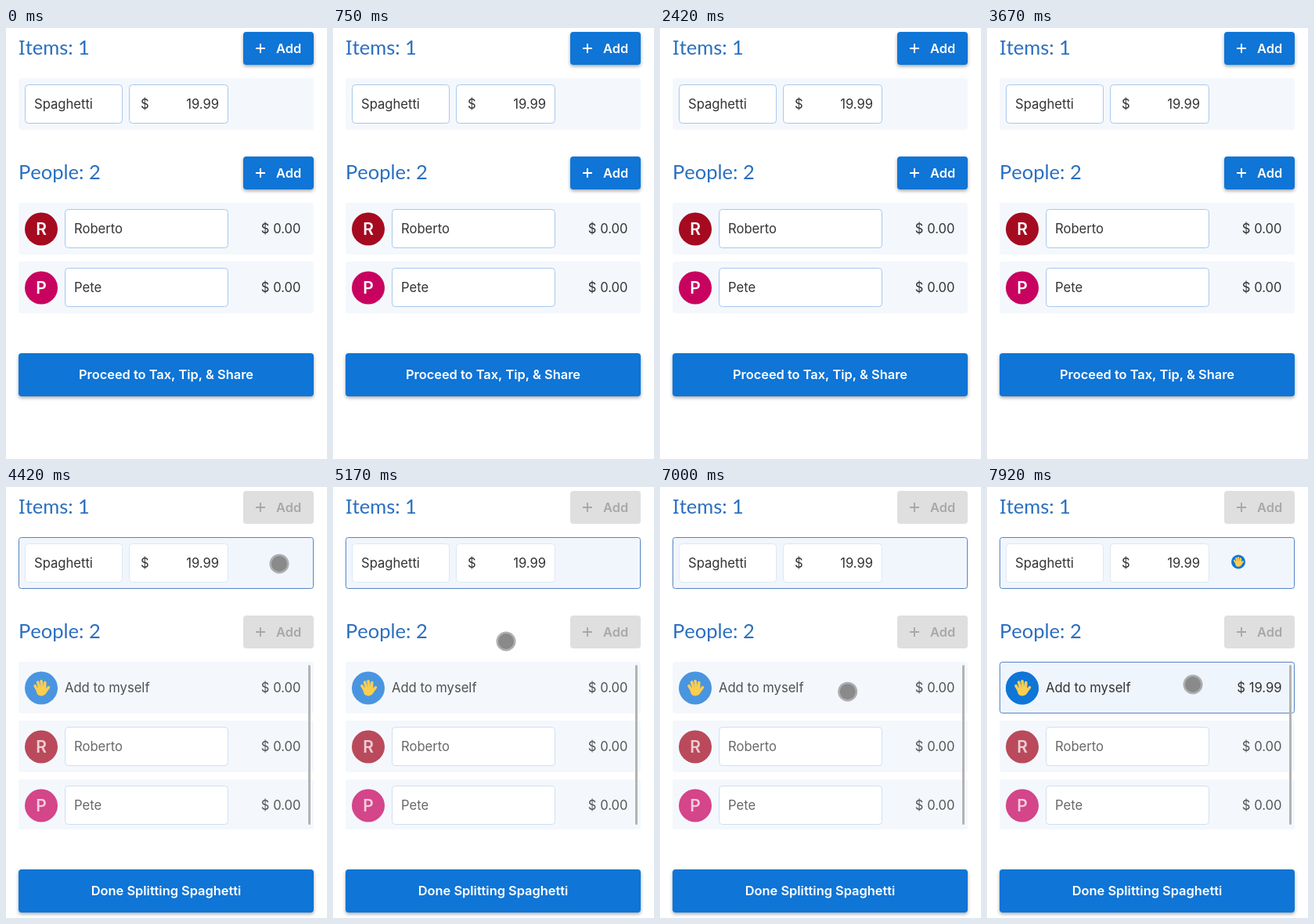
Write an HTML page with a canvas that moves like this. It is 410 by 550 pixels and loops after 8000 ms.

```html
<!DOCTYPE html>
<html lang="en">
<head>
<meta charset="utf-8">
<title>Bill splitter</title>
<style>
html, body { margin: 0; width: 100%; height: 100%; overflow: hidden; background: #fff; }
canvas { display: block; width: 410px; height: 550px; }
</style>
</head>
<body>
<canvas id="stage"></canvas>
<script>
const W = 410, H = 550, LOOP = 8000;
const SPLIT_AT = 4050, PICK_AT = 7600;
const BLUE = '#0f75d6', INK = '#333', ROW = '#f4f8fd';
const BODY = '16.6px Inter, sans-serif';
const BOLD = '600 16.4px Inter, sans-serif';
const PEOPLE = [
  { name: 'Roberto', color: '#a50a20' },
  { name: 'Pete', color: '#c8035f' }
];
// Pointer stops: time, x, y
const PATH = [
  [3700, 349, 98], [4480, 349, 98], [5120, 221, 197], [5400, 221, 197],
  [6250, 230, 265], [6750, 230, 265], [7450, 263, 252], [8000, 263, 252]
];

const canvas = document.getElementById('stage');
const ctx = canvas.getContext('2d');
const dpr = window.devicePixelRatio || 1;
canvas.width = W * dpr;
canvas.height = H * dpr;

const clamp = v => Math.max(0, Math.min(1, v));
const ease = v => v * v * (3 - 2 * v);
const ramp = (t, start, length) => ease(clamp((t - start) / length));

function box(x, y, w, h, r, fill, stroke) {
  ctx.beginPath();
  ctx.roundRect(x, y, w, h, r);
  if (fill) { ctx.fillStyle = fill; ctx.fill(); }
  if (stroke) { ctx.strokeStyle = stroke; ctx.lineWidth = 1; ctx.stroke(); }
}

function disc(x, y, r, fill) {
  ctx.beginPath();
  ctx.arc(x, y, r, 0, Math.PI * 2);
  ctx.fillStyle = fill;
  ctx.fill();
}

function text(str, x, y, color = INK, font = BODY, align = 'left') {
  ctx.font = font;
  ctx.fillStyle = color;
  ctx.textAlign = align;
  ctx.fillText(str, x, y);
  return ctx.measureText(str).width;
}

function withAlpha(alpha, draw) {
  if (alpha <= 0) return;
  ctx.save();
  ctx.globalAlpha *= alpha;
  draw();
  ctx.restore();
}

function raised(x, y, w, h) {
  ctx.save();
  ctx.shadowColor = 'rgba(0,0,0,.35)';
  ctx.shadowBlur = 4 * dpr;
  ctx.shadowOffsetY = 2 * dpr;
  box(x, y, w, h, 4, BLUE);
  ctx.restore();
}

function addButton(y, off) {
  const face = color => {
    ctx.strokeStyle = color;
    ctx.lineWidth = 1.9;
    ctx.beginPath();
    ctx.moveTo(319, y + 21); ctx.lineTo(331, y + 21);
    ctx.moveTo(325, y + 15); ctx.lineTo(325, y + 27);
    ctx.stroke();
    text('Add', 345, y + 26.5, color, BOLD);
  };
  withAlpha(1 - off, () => { raised(303, y, 90, 42); face('#fff'); });
  withAlpha(off, () => { box(303, y, 90, 42, 4, '#dfdfdf'); face('#a8a8a8'); });
}

function mainButton(y, label) {
  raised(16, y, 377, 55);
  text(label, 204.5, y + 33, '#fff', BOLD, 'center');
}

function field(x, y, w, stroke) {
  box(x + .5, y + .5, w - 1, 49, 4, '#fff', stroke);
}

function hand(x, y, scale) {
  ctx.save();
  ctx.translate(x, y);
  ctx.rotate(-.16);
  ctx.scale(scale, scale);
  ctx.strokeStyle = ctx.fillStyle = '#fbce50';
  ctx.lineCap = 'round';
  ctx.lineWidth = 3.6;
  const fingers = [[-5, 2, -7.5, -4], [-2, 0, -3.2, -8], [1.4, 0, 1.4, -8.6], [4.4, 1, 5.8, -6], [4, 6, 9.4, .8]];
  for (const [ax, ay, bx, by] of fingers) {
    ctx.beginPath();
    ctx.moveTo(ax, ay);
    ctx.lineTo(bx, by);
    ctx.stroke();
  }
  ctx.beginPath();
  ctx.roundRect(-6.8, -1, 13, 11, [2, 3, 6, 6]);
  ctx.fill();
  ctx.restore();
}

function heading(first, rest, y) {
  const font = '25.5px Lato, sans-serif';
  const firstFont = first === 'I' ? '25.5px "Noto Sans", sans-serif' : font;
  const w = text(first, 16, y, '#2a6fc0', firstFont);
  text(rest, 16 + w, y, '#2a6fc0', font);
}

function itemRow(split, picked) {
  box(16, 64, 377, 66, 3, ROW);
  withAlpha(split, () => box(16.5, 64.5, 376, 65, 3, '#f1f6fd', '#5585c4'));
  const edge = split > .5 ? '#dde7f3' : '#a8c8ec';
  field(24, 72, 125, edge);
  field(157, 72, 127, edge);
  text('Spaghetti', 36, 103);
  text('$', 172, 103);
  text('19.99', 272, 103, INK, BODY, 'right');
  withAlpha(picked, () => {
    disc(321, 95.5, 9, BLUE);
    hand(321, 95.5, .62);
  });
}

function personRow(person, y, split) {
  box(16, y, 377, 66, 3, ROW);
  withAlpha(split ? .73 : 1, () => {
    disc(45, y + 33.5, 21, person.color);
    text(person.name[0], 45, y + 41, '#fff', '600 21px Inter, sans-serif', 'center');
  });
  field(75, y + 8, 209, split ? '#cfdff1' : '#a8c8ec');
  text(person.name, 87, y + 39, split ? '#686868' : INK);
  text('$ 0.00', 376.5, y + 39, split ? '#555' : INK, BODY, 'right');
}

function myselfRow(picked) {
  box(16, 223, 377, 66, 3, ROW);
  withAlpha(picked, () => box(16.5, 223.5, 376, 65, 3, '#eff5fd', '#5585c4'));
  disc(45, 256.5, 21, '#4a95e0');
  withAlpha(picked, () => disc(45, 256.5, 21, BLUE));
  hand(45, 256.5, 1);
  const color = picked > .5 ? INK : '#505050';
  text('Add to myself', 75, 262, color);
  text(picked > 0 ? '$ 19.99' : '$ 0.00', 376.5, 262, color, BODY, 'right');
}

function pointer(t) {
  if (t < PATH[0][0]) return;
  const i = PATH.findIndex(p => p[0] > t);
  const [t0, x0, y0] = PATH[i - 1], [t1, x1, y1] = PATH[i];
  const k = ramp(t, t0, t1 - t0);
  const x = x0 + (x1 - x0) * k, y = y0 + (y1 - y0) * k;
  withAlpha(ramp(t, PATH[0][0], 150), () => {
    disc(x, y, 12.5, 'rgba(150,150,150,.75)');
    disc(x, y, 10, '#8a8a8a');
  });
}

function draw(t) {
  const split = ramp(t, SPLIT_AT, 280);
  const picked = ramp(t, PICK_AT, 220);
  const splitting = t >= SPLIT_AT;
  ctx.setTransform(dpr, 0, 0, dpr, 0, 0);
  ctx.fillStyle = '#fff';
  ctx.fillRect(0, 0, W, H);

  heading('I', 'tems: 1', 34);
  addButton(5, split);
  itemRow(split, picked);
  heading('P', 'eople: 2', 193);
  addButton(164, split);

  ctx.save();
  ctx.beginPath();
  ctx.rect(0, 220, W, splitting ? 217 : 150);
  ctx.clip();
  if (splitting) myselfRow(picked);
  PEOPLE.forEach((p, i) => personRow(p, 223 + 75 * (i + (splitting ? 1 : 0)), splitting));
  ctx.restore();

  if (splitting) {
    box(386, 227, 3, 204, 1.5, '#b3b3b3');
    mainButton(488, 'Done Splitting Spaghetti');
  } else {
    mainButton(415, 'Proceed to Tax, Tip, & Share');
  }
  pointer(t);
}

const start = performance.now();
function tick() {
  draw((performance.now() - start) % LOOP);
  requestAnimationFrame(tick);
}
tick();
</script>
</body>
</html>
```
